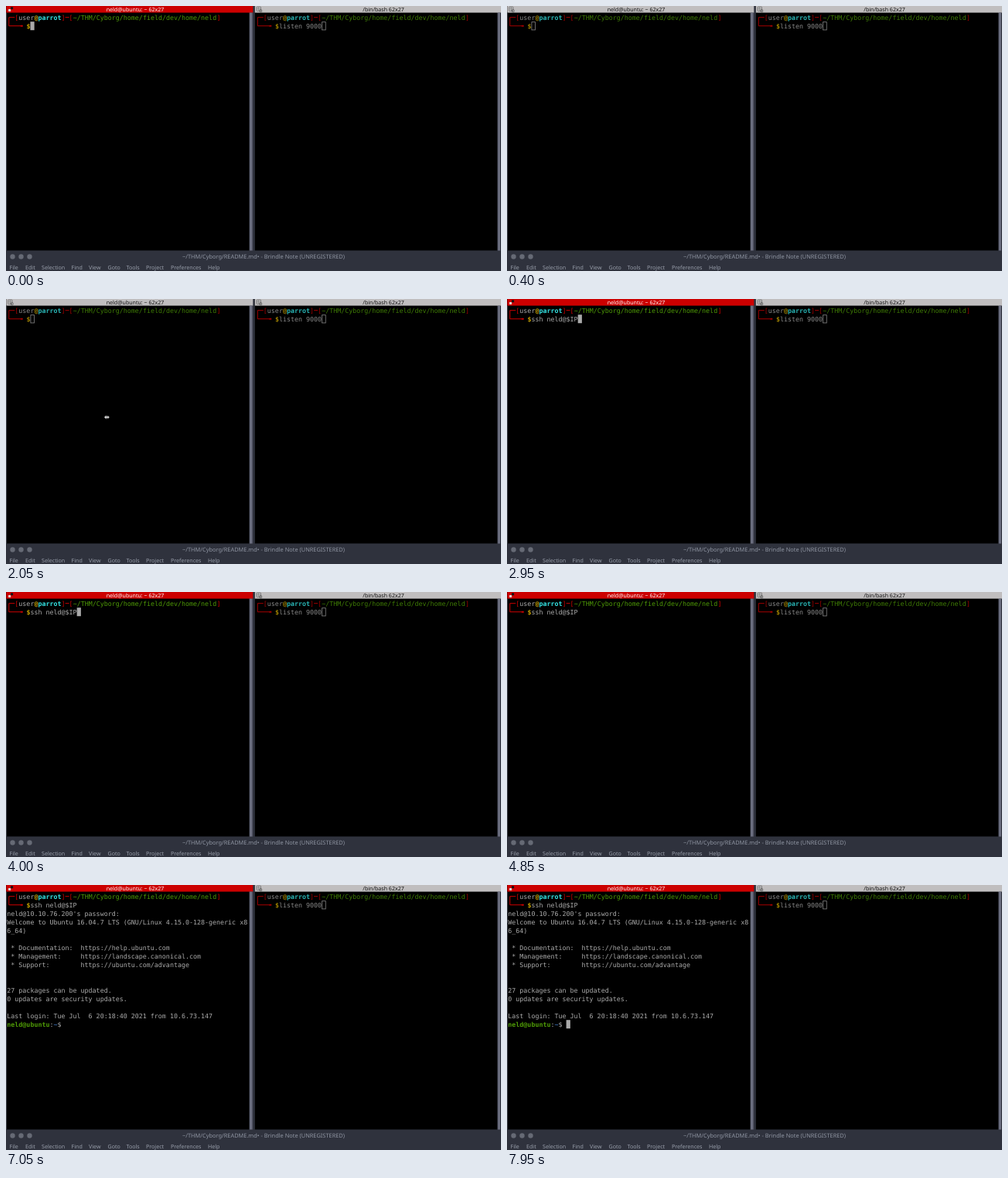
Animation, 640 px wide and 342 px high, one loop 8 s. Source, as an HTML page:

```html
<!DOCTYPE html>
<html lang="en">
<head>
<meta charset="utf-8">
<title>Terminal login</title>
<style>
html, body { margin: 0; width: 100%; height: 100%; overflow: hidden; background: #000; }
svg { display: block; width: 100vw; height: 100vh; }
text { white-space: pre; text-rendering: geometricPrecision; }
.term { font: 8.34px "DejaVu Sans Mono", monospace; }
.bold { font-weight: 700; }
.ui { font: 7.1px "Noto Sans", sans-serif; }
</style>
</head>
<body>
<svg id="stage" viewBox="0 0 640 342" preserveAspectRatio="none"></svg>
<script>
const LOOP = 8000, COL = 5.02, ROW = 11, TOP = 9.2;
const C = { fg: '#aaaaaa', red: '#cc0000', green: '#4e9a06', gold: '#c4a000',
            cyan: '#34e2e2', blue: '#3465a4', idle: '#c0bebf', bar: '#2f323d', thumb: '#6a6d7e' };
const stage = document.getElementById('stage');

function el(parent, tag, attrs, text) {
  const node = document.createElementNS('http://www.w3.org/2000/svg', tag);
  for (const k in attrs) node.setAttribute(k, attrs[k]);
  if (text) node.textContent = text;
  parent.appendChild(node);
  return node;
}
const rect = (p, x, y, width, height, fill) => el(p, 'rect', { x, y, width, height, fill });
const show = (node, on) => node.setAttribute('visibility', on ? 'visible' : 'hidden');
const label = (p, x, y, str, fill, size = 7.1, anchor = 'start') =>
  el(p, 'text', { x, y, fill, class: 'ui', 'text-anchor': anchor, style: `font-size:${size}px` }, str);
const cell = (p, col, row, str, fill = C.fg, bold = false) =>
  el(p, 'text', { x: col * COL, y: TOP + row * ROW + 8.5, fill, class: bold ? 'term bold' : 'term' }, str);

function prompt(p) {
  el(p, 'path', { d: 'M10 14.7H2.5V25.7H18M75.3 14.7H80.3', fill: 'none', stroke: C.red });
  el(p, 'path', { d: 'M17.5 25.7H20.5', stroke: C.red, 'stroke-width': 1.9 });
  cell(p, 2, 0, '[', C.red);
  cell(p, 3, 0, 'user');
  cell(p, 7, 0, '@', C.gold, true);
  cell(p, 8, 0, 'parrot', C.cyan, true);
  cell(p, 14, 0, ']', C.red);
  cell(p, 16, 0, '[', C.red);
  cell(p, 17, 0, '~/THM/Cyborg/home/field/dev/home/neld', C.green);
  cell(p, 54, 0, ']', C.red);
  cell(p, 5, 1, '$', C.gold, true);
}

function pane(x, width, title, mid) {
  rect(stage, x, 0, width, 315.5, '#000');
  const bar = rect(stage, x, 0, width + 5, 8.6, C.idle);
  const idleIcon = el(stage, 'path', { d: 'M2.5 1.3h5v5h-5zM5 1.3v5M2.5 3.8h5M6.3 5h2.5v2.5h-2.5z',
    transform: `translate(${x} 0)`, fill: '#eee', stroke: '#333', 'stroke-width': .6 });
  const liveIcon = el(stage, 'g', { transform: `translate(${x} 0)` });
  rect(liveIcon, 5.8, 1.3, 3, 3, '#111');
  rect(liveIcon, 2.8, 4, 3, 3, '#ddd');
  const name = label(stage, mid, 6.6, title, '#111', 7.05, 'middle');
  const body = el(stage, 'g', { transform: `translate(${x + 1} 0)` });
  prompt(body);
  const focus = on => {
    bar.setAttribute('fill', on ? C.red : C.idle);
    name.setAttribute('fill', on ? '#fff' : '#111');
    body.setAttribute('opacity', on ? 1 : .8);
    show(idleIcon, !on);
    show(liveIcon, on);
  };
  focus(false);
  return { body, focus };
}

function hollow(p, col, row) {
  return el(p, 'rect', { x: col * COL + .5, y: TOP + row * ROW + .5, width: 4.6, height: 10.2,
                         fill: 'none', stroke: C.fg, 'stroke-width': .8 });
}

// window frame and the two panes
rect(stage, 0, 0, 640, 342, C.bar);
const left = pane(.3, 314, 'neld@ubuntu: ~ 62x27', 167);
const right = pane(321.8, 313.2, '/bin/bash 62x27', 488);
rect(stage, 0, 8.6, .8, 307, '#4d505c');
rect(stage, 315, 8.6, 3.6, 307, C.thumb);
rect(stage, 636, 8.6, 3, 307, C.thumb);

cell(right.body, 6, 1, 'listen 9000');
hollow(right.body, 17, 1);

// editor strip
for (const cx of [8.5, 19.5, 30.5]) el(stage, 'circle', { cx, cy: 323.5, r: 3.2, fill: '#666a75' });
label(stage, 228, 326.4, '~/THM/Cyborg/README.md• - Brindle Note (UNREGISTERED)', '#8f95a2', 7.4);
const menu = { File: 4.5, Edit: 25, Selection: 46, Find: 84.5, View: 107, Goto: 131.5, Tools: 155.5,
               Project: 181, Preferences: 213, Help: 261 };
for (const item in menu) label(stage, menu[item], 340.3, item, '#989eaa');

// session text in the left pane
const COMMAND = 'ssh neld@$IP';
const command = cell(left.body, 6, 1, '');
const password = cell(left.body, 0, 2, "neld@10.10.76.200's password:");
const motd = el(left.body, 'g', {});
[
  'Welcome to Ubuntu 16.04.7 LTS (GNU/Linux 4.15.0-128-generic x8',
  '6_64)',
  '',
  ' * Documentation:  https://help.ubuntu.com',
  ' * Management:     https://landscape.canonical.com',
  ' * Support:        https://ubuntu.com/advantage',
  '', '',
  '27 packages can be updated.',
  '0 updates are security updates.',
  '',
  'Last login: Tue Jul  6 20:18:40 2021 from 10.6.73.147'
].forEach((line, i) => line && cell(motd, 0, i + 3, line));
const shell = el(left.body, 'g', {});
cell(shell, 0, 15, 'neld@ubuntu', C.green, true);
cell(shell, 11, 15, ':');
cell(shell, 12, 15, '~', C.blue, true);
cell(shell, 13, 15, '$');

const block = rect(left.body, 0, 0, COL + .2, ROW, C.fg);
const outline = hollow(left.body, 6, 1);
const pointer = el(stage, 'path', { d: 'M-3.5 0L-.5-2.6V-1H1V-2.3L3.5 0L1 2.3V1H-.5V2.6Z',
                                    fill: '#ddd', stroke: '#333', 'stroke-width': .4 });

const within = (t, a, b) => t >= a && t < b;
const typed = t => t < 2750 ? 0 : Math.min(12, Math.round((Math.floor((t - 2750) / 50) + 1) * 2.4));

function caret(t) {
  if (t < 4250) return [6 + typed(t), 1];
  if (t < 5250) return [0, 2];
  if (t < 6350) return [30, 2];
  if (t < 7050) return [0, 3];
  return [15, 15];
}

function draw(t) {
  const active = !within(t, 50, 2100);
  left.focus(active);

  command.textContent = COMMAND.slice(0, typed(t));
  show(password, t >= 5250);
  show(motd, t >= 7000);
  show(shell, t >= 7050);

  const [col, row] = caret(t);
  const blinkOff = within(t, 3300, 4000) || within(t, 4800, 5450) || within(t, 7000, 7600);
  block.setAttribute('x', col * COL);
  block.setAttribute('y', TOP + row * ROW);
  show(block, active && !blinkOff);
  show(outline, !active);

  const u = Math.min(1, Math.max(0, (t - 1600) / 600));
  const ease = u * u * (3 - 2 * u);
  pointer.setAttribute('transform', `translate(${3.5 + 150 * ease} ${156 - 4 * ease})`);
  show(pointer, within(t, 1550, 2400));
}

const start = performance.now();
function tick() {
  draw((performance.now() - start) % LOOP);
  requestAnimationFrame(tick);
}
draw(0);
requestAnimationFrame(tick);
</script>
</body>
</html>
```
